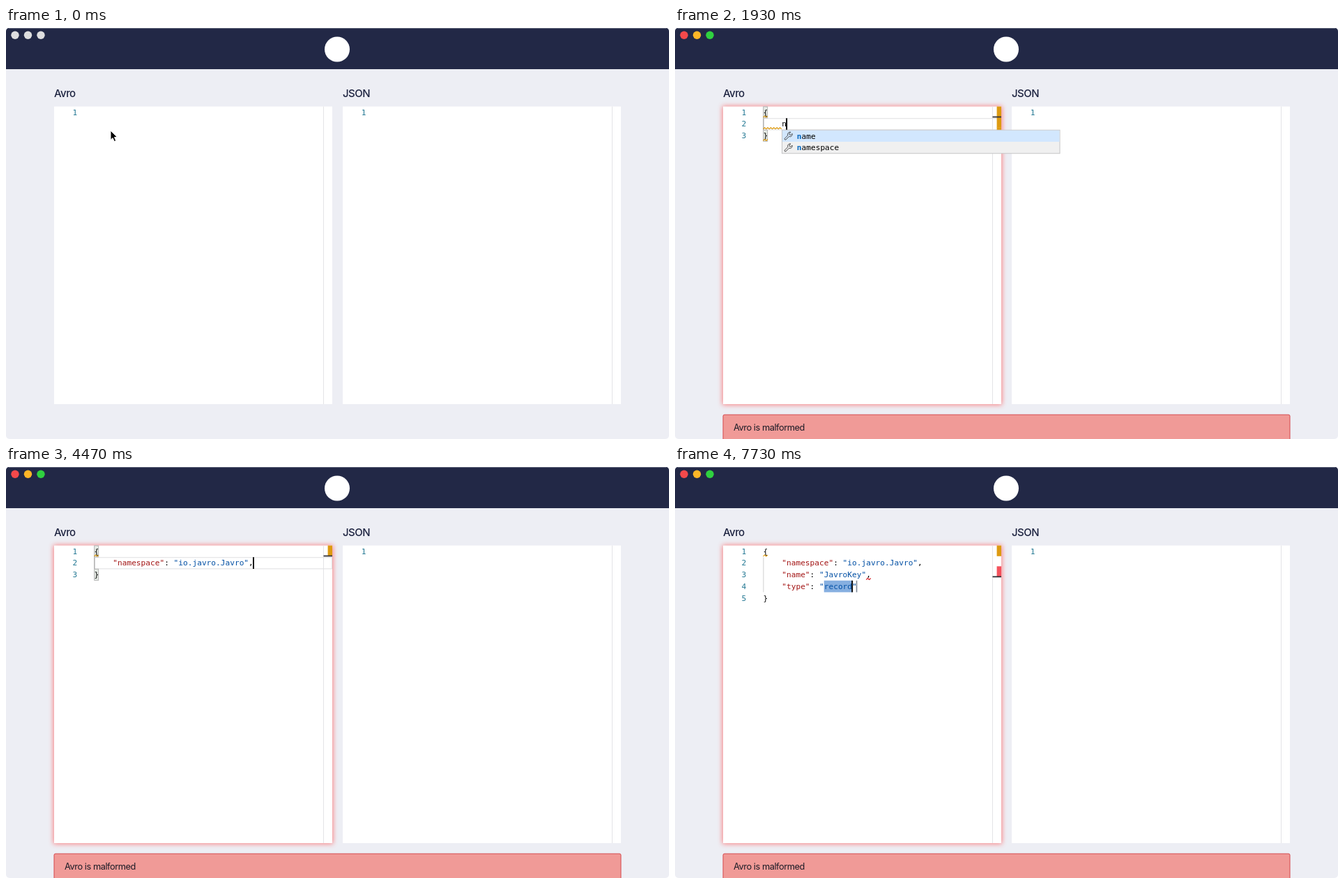
An HTML page that plays this animation: 951x589 px, repeating every 8000 ms.

```html
<!DOCTYPE html>
<html lang="en">
<head>
<meta charset="utf-8">
<title>Avro to JSON editor</title>
<style>
html, body { margin: 0; width: 100%; height: 100%; overflow: hidden; background: #fff; }
svg { display: block; width: 951px; height: 589px; }
text { white-space: pre; }
.ui { font: 500 15px Inter, "Open Sans", sans-serif; letter-spacing: -.55px; fill: #1d2340; }
.msg { font: 400 12.8px Inter, "Open Sans", sans-serif; letter-spacing: -.45px; fill: #1b1b26; }
.code { font: 11.16px "DejaVu Sans Mono", monospace; }
.num { fill: #237893; text-anchor: end; }
.key { fill: #a31515; }
.val { fill: #0451a5; }
.hit { fill: #0066bf; font-weight: bold; }
</style>
</head>
<body>
<svg viewBox="0 0 951 589">
  <defs>
    <filter id="blur" x="-10%" y="-10%" width="120%" height="120%"><feGaussianBlur stdDeviation="3.5"/></filter>
    <path id="wrench" d="M2 12.2L7 7.2A3.8 3.8 0 0 1 11.5 2.2L9.3 4.4L9.8 6.2L11.6 6.7L13.8 4.5A3.8 3.8 0 0 1 8.8 9L3.8 14Q2 14.5 2 12.2Z" fill="none" stroke="#424242"/>
  </defs>
  <rect width="951" height="589" rx="5" fill="#edeef4"/>
  <path d="M0 59V5Q0 0 5 0H946Q951 0 951 5V59Z" fill="#222846"/>
  <path d="M4 .5H947" stroke="#666b80"/>
  <circle cx="475" cy="30.5" r="18" fill="#fff"/>
  <g id="lights"><circle cx="13" cy="10.3" r="5.7"/><circle cx="31.5" cy="10.3" r="5.7"/><circle cx="50" cy="10.3" r="5.7"/></g>
  <text class="ui" x="69" y="99.3">Avro</text>
  <text class="ui" x="483" y="99.3">JSON</text>
  <g id="alert">
    <rect x="68" y="112" width="401" height="428" fill="#ff5a5a" opacity=".75" filter="url(#blur)"/>
    <rect x="69" y="554.2" width="813" height="50" rx="2" fill="#f09a97" stroke="#d6494c"/>
    <text class="msg" x="84" y="577">Avro is malformed</text>
  </g>
  <path d="M69 112.5H468V539H69ZM483 112.5H882V539H483Z" fill="#fff"/>
  <path d="M455.5 112.5V539M869.5 112.5V539" stroke="#e4e4e6"/>
  <text class="code num" x="516.5" y="124.6">1</text>
  <g id="editor"></g>
  <path id="pointer" d="M0 0V13.4L3.1 10.6L5.3 15.6L7.7 14.5L5.5 9.6H9.6Z" stroke="#fff" stroke-width="1"/>
</svg>
<script>
const LOOP = 8000, LEFT = 126.4, TOP = 112.5, CHAR = 6.718, ROW = 16.74, MARK = 14.9;
const GOLD = '#dd9a10', RED = '#f4515c';
const $ = id => document.getElementById(id);
const colX = c => LEFT + c * CHAR;
const rowY = r => TOP + (r - 1) * ROW;

// Each step changes part of the editor state at its time.
const steps = [];
const at = (time, change) => steps.push({ time, change });
const without = (...names) =>
  'aliases doc fields items name namespace size symbols type values'.split(' ').filter(n => !names.includes(n));
const indent = s => '    ' + s;

// Types a word before the closing quote of a field, spread evenly from start to end.
function typeValue(start, end, lines, row, key, before, word) {
  for (let i = 1; i <= word.length; i++) {
    const head = indent(`"${key}": "${before}${word.slice(0, i)}`);
    const next = [...lines];
    next[row - 1] = head + '"';
    at(start + (end - start) * (i - 1) / (word.length - 1),
      { lines: next, cur: [row, head.length], stop: [row, head.length + 1] });
  }
}

const open = [1, 0, 1, GOLD];
const space = indent('"namespace": "io.javro.Javro"');
const name = indent('"name": "JavroKey"');

at(0, { lines: [''], cur: null, marks: [], list: null, pick: 0, typed: '', stop: null, sel: null, brackets: false });
at(70, { cur: [1, 0] });
at(870, { lines: ['{}'], cur: [1, 1], marks: [[1, 0, 2, GOLD]], brackets: true });
at(1130, { lines: ['{', indent(''), '}'], cur: [2, 4] });
at(1200, { marks: [open, [2, 0, 4, GOLD], [3, 0, 1, GOLD]] });
at(1730, { list: without() });
at(1870, { lines: ['{', indent('n'), '}'], cur: [2, 5] });
at(1930, { list: ['name', 'namespace'], typed: 'n' });
at(2200, { pick: 1 });
at(2400, { lines: ['{', indent('"namespace": ""'), '}'], cur: [2, 18], stop: [2, 19], list: null, pick: 0, typed: '' });
at(2530, { marks: [open] });
at(2600, { dim: true });
typeValue(2870, 3070, ['{', '', '}'], 2, 'namespace', '', 'io.');
typeValue(3270, 4000, ['{', '', '}'], 2, 'namespace', 'io.', 'javro.Javro');
at(4200, { cur: [2, 33], stop: null });
at(4470, { lines: ['{', space + ',', '}'], cur: [2, 34] });
at(4670, { lines: ['{', space + ',', indent(''), '}'], cur: [3, 4] });
at(4870, { marks: [open, [2, 33, 34, RED]] });
at(5270, { list: without('namespace') });
at(5400, { lines: ['{', space + ',', indent('n'), '}'], cur: [3, 5], list: ['name'], typed: 'n' });
at(5600, { lines: ['{', space + ',', indent('"name": ""'), '}'], cur: [3, 13], stop: [3, 14], list: null, typed: '' });
at(5730, { marks: [open] });
typeValue(5735, 6270, ['{', space + ',', '', '}'], 3, 'name', '', 'JavroKey');
at(6400, { cur: [3, 22], stop: null });
at(6600, { marks: [open, [3, 12, 22, GOLD]] });
at(6670, { lines: ['{', space + ',', name + ',', '}'], cur: [3, 23] });
at(6730, { marks: [open] });
at(6930, { lines: ['{', space + ',', name + ',', indent(''), '}'], cur: [4, 4] });
at(7130, { marks: [open, [3, 22, 23, RED]] });
at(7330, { list: without('namespace', 'name') });
at(7530, { lines: ['{', space + ',', name + ',', indent('t'), '}'], cur: [4, 5], list: ['type'], typed: 't' });
at(7730, { lines: ['{', space + ',', name + ',', indent('"type": "record"'), '}'], cur: [4, 19],
  sel: [4, 13, 19], stop: [4, 20], list: null, typed: '', brackets: false });

const sliders = [[1130, 507], [4670, 494], [6930, 481]];

const rect = (x, y, w, h, fill, more = '') =>
  `<rect x="${x}" y="${y}" width="${w}" height="${h}" fill="${fill}" ${more}/>`;
const label = (x, y, cls, body) => `<text class="code ${cls}" x="${x}" y="${y + 12.1}">${body}</text>`;
const paint = line => line.trimStart().replace(/"[^"]*"(:?)/g, (s, colon) => colon
  ? `<tspan class="key">${s.slice(0, -1)}</tspan>:`
  : `<tspan class="val">${s}</tspan>`);

function squiggle([row, from, to, color]) {
  const y = rowY(row) + ROW - 1.2;
  let d = `M${colX(from)} ${y}`;
  for (let x = colX(from), i = 0; x < colX(to) - 1; x += 2.2, i++) d += `l2.2 ${i % 2 ? 2 : -2}`;
  return `<path d="${d}" fill="none" stroke="${color === RED ? '#d8232a' : color}" stroke-width="1.1"/>`;
}

function popup(s) {
  const x = 153.5, top = rowY(s.cur[0] + 1) + .3;
  let out = rect(x, top, 398.5, s.list.length * ROW, '#f0f0f0', 'stroke="#c4c4c6"');
  s.list.forEach((item, i) => {
    const y = top + i * ROW, n = s.typed.length;
    if (i === s.pick) out += rect(x + .5, y + .5, 397.5, ROW - .5, '#d2e7fe');
    out += `<use href="#wrench" transform="translate(155.3 ${y + .9}) scale(.93)"/>`;
    out += label(174.8, y + .2, '', `<tspan class="hit">${item.slice(0, n)}</tspan>${item.slice(n)}`);
  });
  return out;
}

function editor(s, t, last) {
  let out = '';
  const n = s.lines.length;
  if (s.cur && !s.sel) out += rect(127, rowY(s.cur[0]) + .5, 340.5, ROW - .6, 'none', 'stroke="#dfdfe1"');
  if (n > 2) out += rect(126.4, rowY(2), 1, (n - 2) * ROW, s.brackets && t > 1730 ? '#939393' : '#d0d0d0');
  if (s.brackets) {
    const ends = n > 1 ? [[1, 0], [n, 0]] : [[1, 0], [1, 1]];
    for (const [r, c] of ends)
      out += rect(colX(c) + .3, rowY(r) + .3, CHAR - .8, ROW - .7, '#e6ece6', 'stroke="#b4b4b4"');
  }
  if (s.sel) out += rect(colX(s.sel[1]), rowY(s.sel[0]), (s.sel[2] - s.sel[1]) * CHAR, ROW, '#86afe0');
  s.lines.forEach((line, i) => {
    const pad = line.length - line.trimStart().length;
    out += label(102.2, rowY(i + 1), 'num', i + 1) + label(colX(pad), rowY(i + 1), '', paint(line));
  });
  for (const m of s.marks) {
    out += squiggle(m) + rect(461.6, TOP + (m[0] - 1) * MARK, 6.4, MARK + .4, m[3]);
  }
  if (s.stop) out += rect(colX(s.stop[1]) - 1, rowY(s.stop[0]), 1.6, ROW, '#7d8796');
  if (s.cur) {
    const [r, c] = s.cur, x = colX(c) - .8, y = rowY(r);
    out += rect(455.5, TOP + (r - 1) * MARK - .8, 12.5, 1.8, '#33333b');
    if (s.dim) out += rect(x + .2, y, 1, ROW, '#c3c9d3');
    else if (t - last < 500) out += rect(x, y, 1.9, ROW, '#000');
  }
  for (const [start, bottom] of sliders) {
    const fade = Math.min(1, 1 - (t - start - 200) / 420);
    if (t >= start && fade > 0)
      out += rect(455.5, TOP, 12.5, bottom - TOP, '#646464', `opacity="${(.4 * fade).toFixed(3)}"`);
  }
  return s.list ? out + popup(s) : out;
}

function movePointer(t) {
  const u = t < 270 ? 0 : (Math.floor((t - 270) / 66) + 1) / 6, v = 1 - u;
  const x = 150 * v * v + 840 * u * v + 905 * u * u;
  const y = 147 * v * v + 580 * u * v - 18 * u * u;
  $('pointer').setAttribute('transform', `translate(${x} ${y})`);
  $('pointer').style.display = u < 1 ? '' : 'none';
}

const lightColors = ['#f4494b', '#fdb527', '#2fd13f'];
let shown = '';

function draw(t) {
  const state = {};
  let last = 0;
  for (const { time, change } of steps) {
    if (time > t) break;
    Object.assign(state, { dim: false }, change);
    last = time;
  }
  const markup = editor(state, t, last);
  if (markup !== shown) $('editor').innerHTML = shown = markup;
  [...$('lights').children].forEach((c, i) => c.setAttribute('fill', t < 70 ? '#dededf' : lightColors[i]));
  $('alert').style.display = t < 870 ? 'none' : '';
  movePointer(t);
}

const begin = performance.now();
function frame() {
  draw((performance.now() - begin) % LOOP);
  requestAnimationFrame(frame);
}
frame();
</script>
</body>
</html>
```
